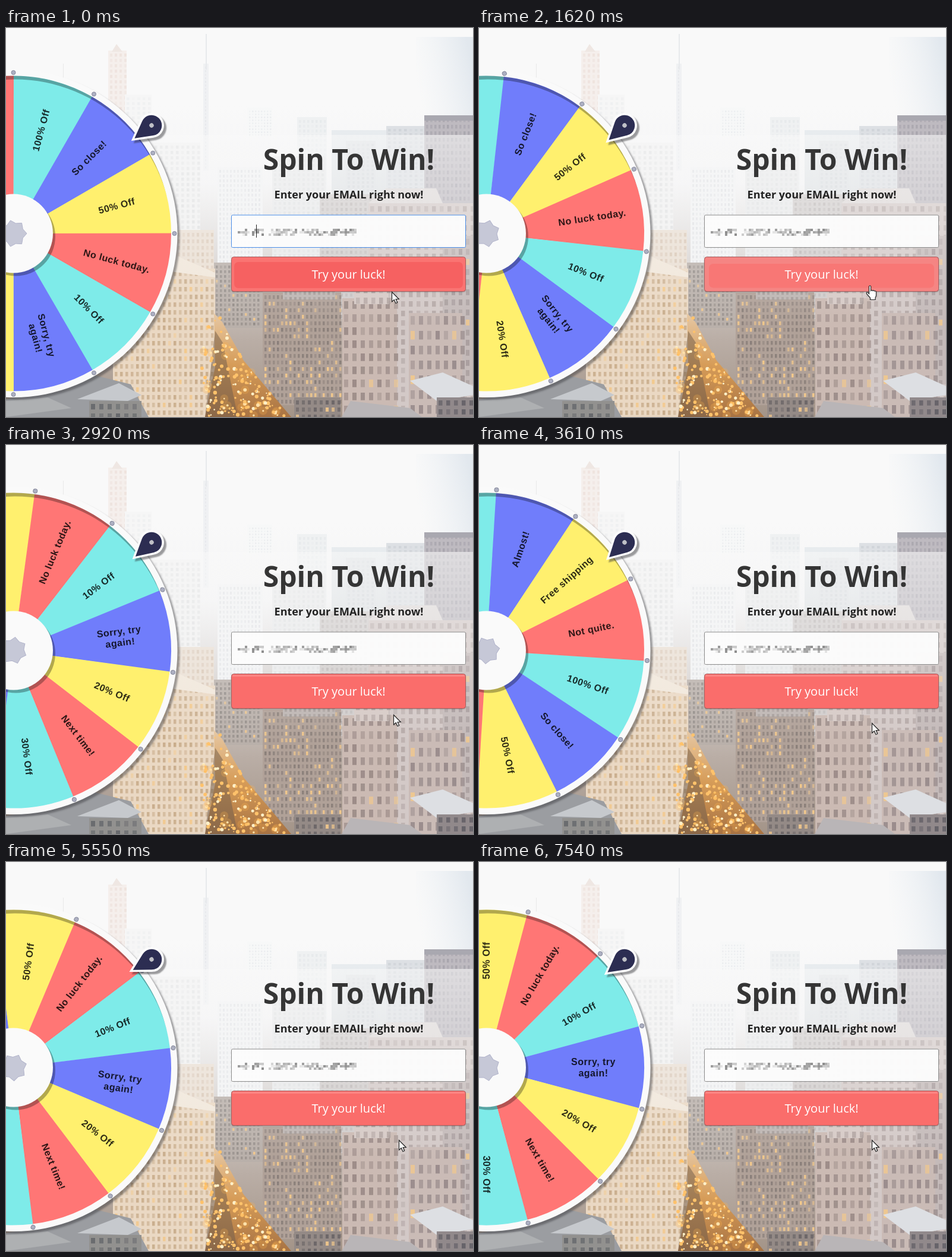
These frames come from a looping animation (786x655 px, 7.87 s). An HTML page with a canvas:

```html
<!DOCTYPE html>
<html lang="en">
<head>
<meta charset="utf-8">
<title>Spin To Win!</title>
<style>
html, body { margin: 0; width: 100%; height: 100%; overflow: hidden; background: #f9f9f9; }
canvas { display: block; width: 786px; height: 655px; }
</style>
</head>
<body>
<canvas id="stage" width="786" height="655"></canvas>
<script>
const W = 786, H = 655, LOOP = 7870, TAU = Math.PI * 2, RAD = Math.PI / 180;
const ctx = document.getElementById('stage').getContext('2d');
const CENTER = { x: 12.5, y: 346 };
const COLORS = ['#7eebe9', '#707dfb', '#fff06e', '#ff7675'];
const LABELS = ['100% Off', 'So close!', '50% Off', 'No luck today.', '10% Off', 'Sorry, try|again!',
  '20% Off', 'Next time!', '30% Off', 'Almost!', 'Free shipping', 'Not quite.'];

// [time, number of wheel steps shown so far]
const STEPS = [[920, 0], [1100, 4], [1720, 17], [2180, 27], [2510, 34], [2920, 43], [3330, 52], [3610, 58],
  [4120, 69], [4910, 86], [5550, 100], [5700, 103], [6520, 121], [7310, 138], [7540, 143]];
// [time, degrees, degrees per ms]: quick start, long slow-down over ten turns
const SPIN = [[900, 0, .55], [1100, 161.4, 1.12], [2180, 1356, 1.06], [2920, 2077.8, .875],
  [3610, 2613.6, .68], [5550, 3533, .32], [7540, 3885, 0]];
const FLICK = [[0, 0], [3.6, -6.5], [6, -5.7], [7.8, -3.8], [12, 0], [21.4, 0], [23, 8], [30, 0]];
const MOUSE = [[920, 649, 444], [1010, 655, 433], [1750, 655, 433], [2180, 653, 446], [2920, 652, 454], [3610, 661, 468]];

const clamp = v => Math.max(0, Math.min(1, v));
const ramp = (t, a, b) => clamp((t - a) / (b - a));

function seeded(seed) {
  return () => (seed = (seed * 16807) % 2147483647) / 2147483647;
}

function segment(keys, t) {
  let i = 0;
  while (i < keys.length - 2 && t >= keys[i + 1][0]) i++;
  return [keys[i], keys[i + 1], ramp(t, keys[i][0], keys[i + 1][0])];
}

function track(keys, t, column = 1) {
  const [a, b, u] = segment(keys, t);
  return a[column] + (b[column] - a[column]) * u;
}

// The picture is held between steps.
function heldTime(t) {
  if (t < 920 || t >= 7540) return t;
  const [a, b, u] = segment(STEPS, t), n = b[1] - a[1];
  return a[0] + Math.floor(u * n + .001) / n * (b[0] - a[0]);
}

function wheelAngle(t) {
  if (t < 920) return 0;
  const [a, b, u] = segment(SPIN, t), d = b[0] - a[0], v = 1 - u;
  return a[1] * (1 + 2 * u) * v * v + a[2] * d * u * v * v + b[1] * u * u * (3 - 2 * u) - b[2] * d * u * u * v;
}

function disc(c, x, y, r, fill) {
  c.fillStyle = fill;
  c.beginPath();
  c.arc(x, y, r, 0, TAU);
  c.fill();
}

function poly(c, points, fill) {
  c.fillStyle = fill;
  c.beginPath();
  points.forEach(p => c.lineTo(p[0], p[1]));
  c.closePath();
  c.fill();
}

function box(x, y, w, h, r, fill, stroke) {
  ctx.beginPath();
  ctx.roundRect(x, y, w, h, r);
  if (fill) { ctx.fillStyle = fill; ctx.fill(); }
  if (stroke) { ctx.strokeStyle = stroke; ctx.lineWidth = 1; ctx.stroke(); }
}

function text(s, x, y, font, fill) {
  ctx.font = font;
  ctx.fillStyle = fill;
  ctx.textAlign = 'center';
  ctx.fillText(s, x, y);
}

function paintCity() {
  const canvas = document.createElement('canvas'), c = canvas.getContext('2d'), rnd = seeded(41);
  canvas.width = W;
  canvas.height = H;

  function gradient(x0, y0, x1, y1, ...colors) {
    const g = c.createLinearGradient(x0, y0, x1, y1);
    colors.forEach((color, i) => g.addColorStop(i / (colors.length - 1), color));
    return g;
  }
  function block(x, y, w, h, wall, pane, dx, dy, lit = 0) {
    c.fillStyle = wall;
    c.fillRect(x, y, w, h);
    for (let py = y + 5; py < y + h - 3; py += dy)
      for (let px = x + 3; px < x + w - 2; px += dx) {
        c.fillStyle = rnd() < lit ? '#f3c98c' : pane;
        c.globalAlpha = .45 + rnd() * .55;
        c.fillRect(px, py, dx * .5, dy * .58);
      }
    c.globalAlpha = 1;
  }

  c.fillStyle = gradient(0, 0, 0, H, '#f9f9f9', '#f9f9f9', '#f4f4f5', '#d9d5d3', '#baaea6', '#a39488');
  c.fillRect(0, 0, W, H);
  c.fillStyle = gradient(690, 90, 786, 70, '#eef2f600', '#e2e8ee');
  c.fillRect(690, 15, 96, 140);
  // pale skyline
  block(172, 38, 31, 110, '#f5efec', '#efe4df', 8, 9);
  poly(c, [[178, 40], [186, 27], [196, 40]], '#efe7e3');
  block(200, 112, 45, 60, '#f6f6f6', '#eff0f1', 9, 8);
  block(332, 60, 9, 180, '#f0f1f3', '#e7e9ec', 4, 6);
  c.fillRect(336, 10, 2, 60);
  c.fillStyle = '#e9e9e9';
  c.fillRect(96, 60, 1, 25);
  block(406, 134, 42, 50, '#f7f8f8', '#eceef0', 5, 5);
  block(490, 150, 50, 150, '#eff1f2', '#e7eaec', 7, 8);
  c.fillStyle = gradient(0, 160, 0, 310, '#e9edf0', '#dcdfe1');
  c.fillRect(548, 172, 160, 150);
  block(572, 190, 50, 105, '#dfe2e5', '#d4d8dc', 8, 7);
  block(640, 165, 64, 135, '#dde0e4', '#d0d4d9', 9, 7);
  block(448, 216, 90, 180, '#e9eaeb', '#dfe1e2', 8, 8);
  block(247, 193, 80, 190, '#f1f1f1', '#dfe0e1', 9, 9);
  block(356, 234, 76, 170, '#f2f3f4', '#e0e2e5', 6, 8);
  block(704, 147, 82, 260, '#bebac0', '#a8a5ad', 7, 11);
  c.fillStyle = '#a9a8b0';
  c.fillRect(704, 147, 82, 9);
  // middle distance
  block(528, 280, 90, 210, '#d1cdcc', '#bdb8b7', 8, 9);
  block(350, 395, 82, 110, '#b9b0aa', '#938c88', 7, 8, .15);
  block(286, 340, 64, 150, '#eadfd3', '#dac8b7', 8, 11);
  block(610, 295, 176, 360, '#d3c9c7', '#b4a8a6', 13, 16);
  poly(c, [[610, 295], [640, 270], [724, 270], [735, 295]], '#ded9d8');
  block(735, 350, 51, 250, '#c4bab9', '#a59a9b', 12, 17, .05);
  // foreground
  block(432, 445, 132, 190, '#b0a198', '#8a7f7a', 7, 11, .22);
  block(466, 412, 88, 45, '#bdb5b2', '#a29a97', 8, 9);
  block(180, 405, 172, 250, '#ead8c3', '#c9ad8c', 9, 13, .1);
  poly(c, [[240, 405], [290, 385], [352, 412], [352, 420]], '#f1e7da');
  block(566, 455, 92, 200, '#cbbab3', '#9d8d89', 14, 22, .06);
  block(586, 395, 58, 70, '#d6cac6', '#aea19e', 13, 18);
  block(678, 480, 90, 175, '#cabbb6', '#9b8e8e', 14, 25, .05);

  // lit avenue
  poly(c, [[350, 480], [364, 495], [400, 560], [480, 655], [335, 655], [352, 570]],
    gradient(0, 480, 0, 655, '#e6c8a4', '#d69c58', '#a87343'));
  poly(c, [[352, 510], [365, 530], [390, 655], [335, 655]], '#75614e88');
  for (let i = 0; i < 170; i++) {
    const d = Math.sqrt(rnd()), y = 485 + d * 168, x = 355 + d * d * 55 + (rnd() - .5) * (18 + d * 120);
    disc(c, x, y, 1 + rnd() * 2.2, i % 3 ? '#ffc26b' : '#fff0c8');
    if (i % 9 === 0) disc(c, x, y, 7, '#ffb34d40');
  }
  // snowy roofs
  poly(c, [[0, 625], [90, 606], [150, 585], [210, 600], [240, 655], [0, 655]], '#9b9da1');
  poly(c, [[120, 625], [190, 598], [228, 618], [205, 628]], '#c6c9cd');
  poly(c, [[0, 628], [70, 622], [110, 640], [0, 655]], '#aeb0b2');
  block(140, 628, 88, 27, '#92918f', '#67696d', 14, 16);
  poly(c, [[680, 594], [735, 580], [786, 603], [786, 618], [725, 628]], '#dddfe3');
  block(725, 622, 61, 33, '#91898b', '#625f66', 13, 15);
  poly(c, [[565, 655], [580, 628], [680, 640], [700, 655]], '#b9b5b7');
  block(485, 622, 78, 33, '#948a86', '#6e6869', 10, 12, .15);
  // haze
  c.fillStyle = gradient(0, 180, 0, 500, '#f9f9f98c', '#f9f9f900');
  c.fillRect(0, 180, W, 320);
  return canvas;
}

function drawWheel(angle) {
  ctx.save();
  ctx.translate(CENTER.x, CENTER.y);
  ctx.save();
  ctx.shadowColor = 'rgba(50,50,55,.45)';
  ctx.shadowBlur = 3;
  ctx.shadowOffsetX = 4;
  ctx.shadowOffsetY = 4;
  disc(ctx, 0, 0, 276, '#fafafa');
  ctx.restore();

  ctx.save();
  ctx.rotate(angle * RAD);
  LABELS.forEach((label, i) => {
    ctx.save();
    ctx.rotate((i * 30 - 75) * RAD);
    ctx.fillStyle = COLORS[i % 4];
    ctx.beginPath();
    ctx.moveTo(0, 0);
    ctx.arc(0, 0, 265.5, -15.1 * RAD, 15.1 * RAD);
    ctx.fill();
    const lines = label.split('|');
    ctx.letterSpacing = '0.5px';
    lines.forEach((line, n) => text(line, 180, 5.5 + (n - (lines.length - 1) / 2) * 19,
      'bold 16px "Liberation Sans", Arial, sans-serif', 'rgba(0,0,0,.82)'));
    ctx.restore();
  });
  ctx.restore();

  // inner shade below the rim
  ctx.fillStyle = 'rgba(0,0,0,.3)';
  ctx.save();
  ctx.beginPath();
  ctx.arc(0, 0, 265.5, 0, TAU);
  ctx.clip();
  ctx.beginPath();
  ctx.arc(0, 0, 270, 0, TAU);
  ctx.arc(2, 6, 265.5, 0, TAU, true);
  ctx.fill('evenodd');
  ctx.restore();

  ctx.rotate(angle * RAD);
  for (let i = 0; i < 12; i++) {
    const a = i * 30 * RAD;
    disc(ctx, 271 * Math.cos(a), 271 * Math.sin(a), 3.5, '#adb0c2');
    ctx.strokeStyle = '#85889b';
    ctx.lineWidth = 1;
    ctx.stroke();
  }
  ctx.rotate(-angle * RAD);
  disc(ctx, 4, 5, 66.5, 'rgba(0,0,0,.3)');
  disc(ctx, 0, 0, 66.5, '#fafafa');
  ctx.rotate(angle * RAD);
  const star = Array.from({ length: 14 }, (_, i) => {
    const r = i % 2 ? 17.5 : 22.5, a = i * TAU / 14;
    return [r * Math.cos(a), r * Math.sin(a)];
  });
  poly(ctx, star, '#c6c8d7');
  ctx.strokeStyle = '#b2b4cb';
  ctx.stroke();
  ctx.restore();
}

function drop(r, tip, fill) {
  const a = Math.acos(r / tip);
  ctx.fillStyle = fill;
  ctx.beginPath();
  ctx.arc(0, 0, r, a, TAU - a);
  ctx.lineTo(tip, 0);
  ctx.closePath();
  ctx.fill();
}

function drawPointer(angle) {
  ctx.save();
  ctx.translate(245, 164);
  ctx.rotate((142.6 + track(FLICK, angle % 30)) * RAD);
  ctx.shadowColor = 'rgba(40,40,45,.45)';
  ctx.shadowBlur = 2;
  ctx.shadowOffsetX = ctx.shadowOffsetY = 4;
  drop(21, 43, '#fdfdfd');
  ctx.shadowColor = 'transparent';
  drop(17.3, 36, '#2c2d52');
  disc(ctx, 0, 0, 3.7, '#bfc0c6');
  ctx.restore();
}

function glossLayer(alpha, outer, inner, inset) {
  if (!alpha) return;
  ctx.globalAlpha = alpha;
  box(380, 386, 393, 57, 3, outer);
  box(379 + inset, 389 + inset, 395 - 2 * inset, 50 - inset * 1.2, 7, inner);
  ctx.globalAlpha = 1;
}

function drawForm(t) {
  text('Spin To Win!', 577, 239, 'bold 48px "Open Sans", sans-serif', '#353535');
  text('Enter your EMAIL right now!', 577, 287, 'bold 18px "Open Sans", sans-serif', '#222');

  box(379.5, 315, 394, 54.5, 2, 'rgba(252,252,252,.97)', t < 920 ? '#4b8ee8' : '#8c8c8c');
  const rnd = seeded(77);
  for (let x = 390; x < 588; x += 4)
    for (let row = 0; row < 3; row++) {
      const v = rnd(), gap = (x > 408 && x < 414) || (x > 433 && x < 442);
      if (gap || v < (row === 1 ? .12 : .5)) continue;
      ctx.fillStyle = `hsl(0 0% ${55 + rnd() * 38}%)`;
      ctx.fillRect(x, 338 + row * 4, 4, 4);
    }
  if (t < 30 || (t >= 590 && t < 920)) {
    ctx.fillStyle = '#222';
    ctx.fillRect(421, 331, 1, 22);
  }

  ctx.save();
  ctx.shadowColor = 'rgba(0,0,0,.3)';
  ctx.shadowBlur = 2;
  ctx.shadowOffsetY = 1;
  box(379.5, 385.5, 394, 58, 4, '#fa6d6b');
  ctx.restore();
  ctx.fillStyle = 'rgba(255,255,255,.16)';
  ctx.fillRect(381, 387, 391, 3);
  glossLayer(1 - ramp(t, 960, 1060), '#fa7472', '#f66161', 5);
  glossLayer(ramp(t, 960, 1060) * (1 - ramp(t, 1700, 2050)), '#f58583', '#f87775', 8);
  box(379.5, 385.5, 394, 58, 4, null, '#a95d5e');
  text('Try your luck!', 576.5, 422, '20px "Open Sans", sans-serif', '#fff');
}

const ARROW = new Path2D('M0 0V16.5L3.8 13L6.5 19L9.2 17.8L6.6 12H11.8Z');
const HAND = new Path2D('M1 1.5Q2.5-1 4 1.5V9Q5.5 7 7 9Q8.5 7.5 10 9.5Q13 8.5 13 12V17Q12.5 19 11.5 21V24H3V21Q0 17.5-3 14Q-4 11-1.5 11.5L1 14Z');

function drawMouse(t) {
  const x = track(MOUSE, t), y = track(MOUSE, t, 2);
  ctx.save();
  ctx.translate(x + .5, y + .5);
  ctx.fillStyle = '#fff';
  ctx.strokeStyle = '#222';
  ctx.lineWidth = 1.2;
  const shape = y < 443.5 ? HAND : ARROW;
  ctx.fill(shape);
  ctx.stroke(shape);
  ctx.restore();
}

const city = paintCity();

function draw(now) {
  const t = heldTime(now % LOOP), angle = wheelAngle(t);
  ctx.drawImage(city, 0, 0);
  drawWheel(angle);
  drawPointer(angle);
  drawForm(t);
  drawMouse(t);
}

const start = performance.now();
function frame() {
  draw(performance.now() - start);
  requestAnimationFrame(frame);
}
frame();
</script>
</body>
</html>
```
